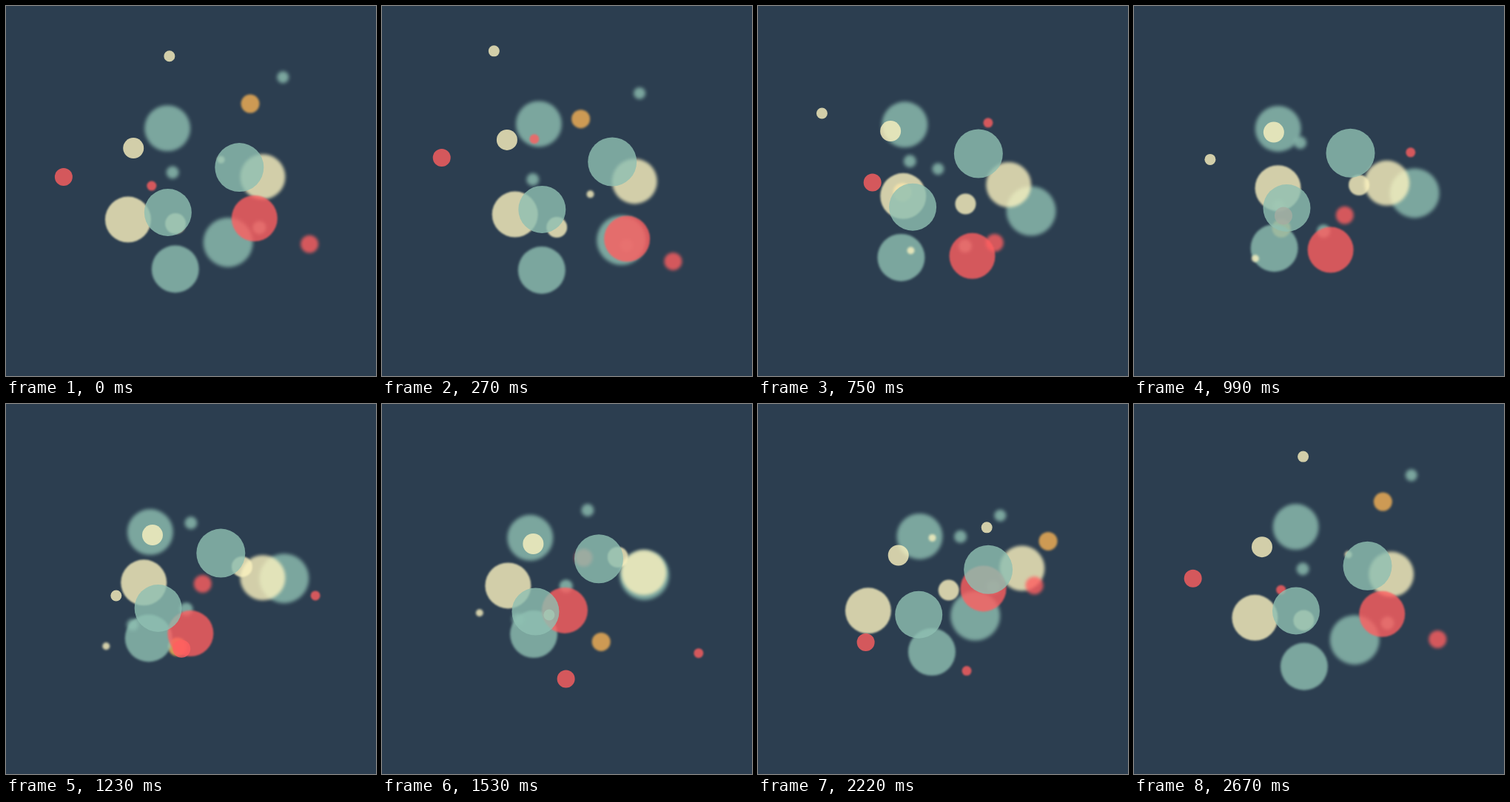
Recreate the animation shown at these times as an HTML page. Size 500x500 px, loop 2.7 s.

```html
<!DOCTYPE html>
<html lang="en">
<head>
<meta charset="utf-8">
<title>Drifting bokeh</title>
<style>
  html, body { margin: 0; width: 100%; height: 100%; overflow: hidden; background: #2c3e50; }
  #stage { position: relative; width: 500px; height: 500px; overflow: hidden; }
  #stage i { position: absolute; left: 0; top: 0; border-radius: 50%; opacity: .8; }
</style>
</head>
<body>
<div id="stage"></div>
<script>
const LOOP = 2700, STEP = 30, MAX_BLUR = 2.9;
const teal = '#8fc0b2', cream = '#fcf3c0', red = '#ff5f60', amber = '#f6b255';

// Back to front: colour, radius, centre x, centre y, orbit, x phase, y phase (degrees)
const dots = [
  [teal, 33.5, 334.7, 275.4, 45, 140.2, 12],
  [teal, 8, 272.3, 198.8, 102.6, -6.4, 178],
  [teal, 8.5, 243.7, 188.4, 46.2, -113.7, 37.4],
  [teal, 31, 207.3, 170.9, 13, -33.3, -115.7],
  [teal, 9, 292.6, 281.5, 50, -4.7, 69],
  [cream, 30.5, 348.4, 231.4, 10.2, -98, 93.4],
  [red, 12, 337.2, 273.9, 73.1, -3.8, 49],
  [amber, 12.5, 292.7, 231.6, 99.6, -68, 178.4],
  [teal, 32, 212.8, 334.3, 23.2, -46.5, 24],
  [cream, 5, 209.9, 259.9, 81.4, 7.6, 129.9],
  [cream, 14, 275.3, 253.2, 46.3, -176.4, 28],
  [red, 6.5, 312.8, 267.4, 118.1, -169.1, -101.9],
  [cream, 31, 172.6, 265.1, 23.9, 108.7, -10.4],
  [red, 31, 290.8, 292.4, 45.5, 8.4, 96.8],
  [cream, 14, 186.8, 186.8, 17.9, -144.6, -73],
  [red, 12, 162.3, 290.9, 87.4, -165, -133.2],
  [teal, 33, 303, 211.2, 12.7, -13.8, -57],
  [cream, 7.7, 200, 171.8, 113.4, -79.3, -156.4],
  [teal, 32, 212.4, 278.4, 6.8, -19, -85]
];

const stage = document.getElementById('stage');
const nodes = dots.map(([color, r], i) => {
  const el = stage.appendChild(document.createElement('i'));
  const blur = MAX_BLUR * (1 - i / (dots.length - 1));
  el.style.cssText = `width:${2 * r}px;height:${2 * r}px;background:${color};filter:blur(${blur.toFixed(2)}px)`;
  return el;
});

const wave = (turn, phase) => Math.cos(turn - phase * Math.PI / 180);

function draw(now) {
  const time = Math.floor((now % LOOP) / STEP) * STEP;
  const turn = 2 * Math.PI * time / LOOP;
  dots.forEach(([, r, cx, cy, orbit, px, py], i) => {
    const x = cx + orbit * wave(turn, px) - r;
    const y = cy + orbit * wave(turn, py) - r;
    nodes[i].style.transform = `translate(${x.toFixed(2)}px,${y.toFixed(2)}px)`;
  });
}

function tick(now) {
  draw(now);
  requestAnimationFrame(tick);
}

draw(0);
requestAnimationFrame(tick);
</script>
</body>
</html>
```
